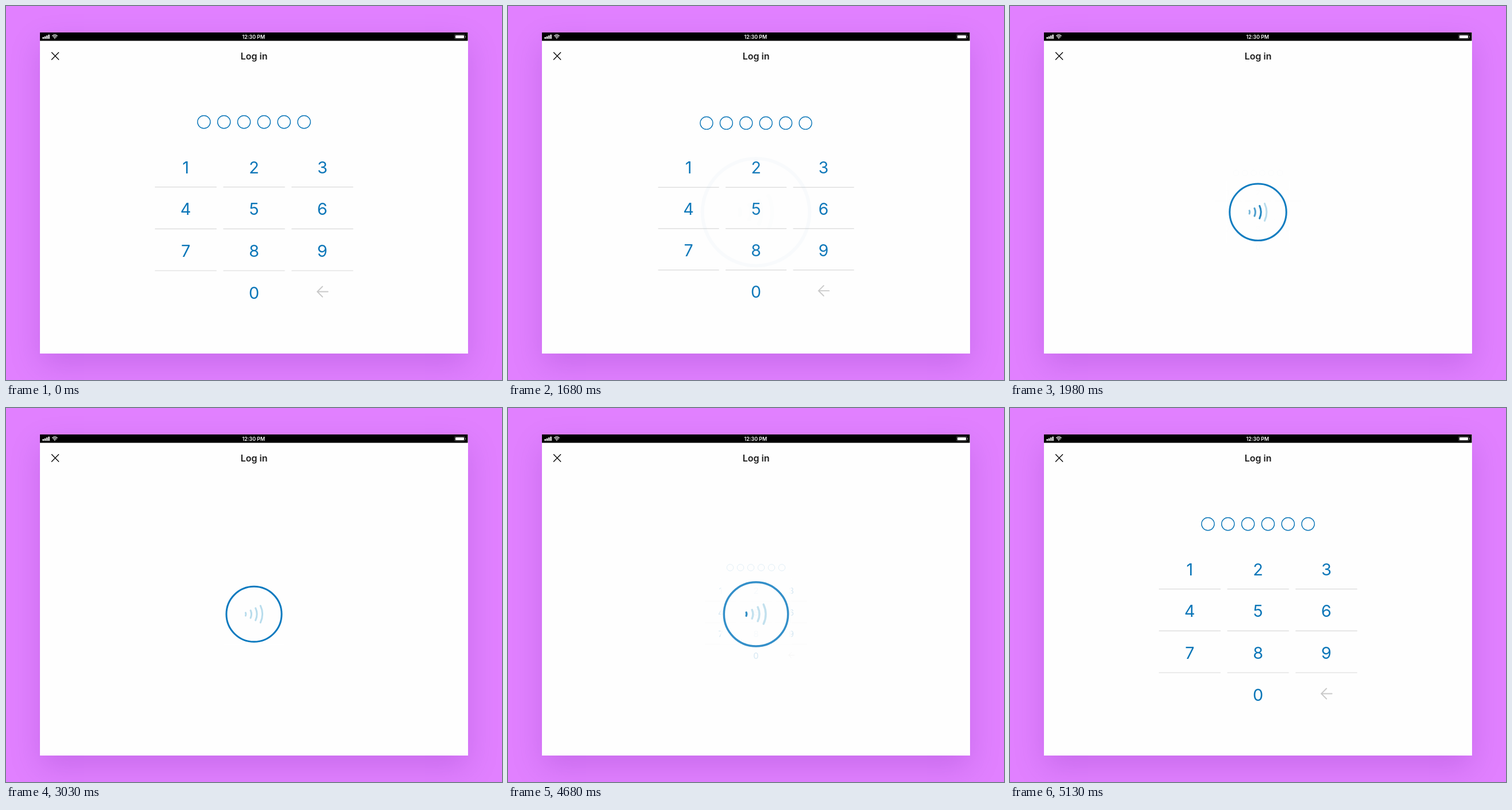
Recreate the animation shown at these times as an HTML page. Size 862 px wide and 650 px high, loop 5.22 s.

```html
<!DOCTYPE html>
<html lang="en">
<head>
<meta charset="utf-8">
<title>Log in</title>
<style>
  html, body { margin: 0; width: 100%; height: 100%; overflow: hidden; background: #e180ff; }
  .panel {
    position: absolute; left: 59px; top: 46px; width: 743.5px; height: 558px;
    background: #fefefe; box-shadow: 0 20px 50px rgba(80, 0, 140, .17);
  }
  svg { position: absolute; left: 0; top: 0; font-family: Inter, sans-serif; }
  text { text-anchor: middle; }
  .line { fill: none; stroke-linecap: round; }
  #keypad text { font-size: 28.8px; fill: #0b76b8; }
</style>
</head>
<body>
<div class="panel"></div>
<svg width="862" height="650" viewBox="0 0 862 650">
  <rect x="59" y="46" width="743.5" height="14.5"/>
  <g fill="#fff">
    <path d="M63.5 54h2.3v3h-2.3zM66.8 52.7h2.3V57h-2.3zM70.1 51.3h2.3V57h-2.3zM73.4 49.8h2.3V57h-2.3z"/>
    <text x="430.3" y="57" font-size="8.9" font-weight="600">12:30 PM</text>
    <rect x="781" y="51" width="15" height="5" rx=".8"/>
    <path d="M83.2 54.8 84.8 57l1.6-2.2a2.5 2.5 0 0 0-3.2 0z"/>
  </g>
  <path class="line" d="M80.5 51.9a6.2 6.2 0 0 1 8.6 0M82.2 53.7a3.7 3.7 0 0 1 5.2 0" stroke="#fff" stroke-width="1.3"/>
  <rect x="779.6" y="49.6" width="17.8" height="7.8" rx="1.8" fill="none" stroke="#777" stroke-width=".7"/>
  <path class="line" d="M798.6 52.5v2" stroke="#777"/>

  <path class="line" d="M79.5 80.7l12 12.4m0-12.4l-12 12.4" stroke="#111" stroke-width="1.5"/>
  <text x="431.2" y="92.6" font-size="16" font-weight="600" fill="#1c1c1c">Log in</text>

  <g id="keypad"></g>
  <g id="reader">
    <rect x="-53" y="-53" width="106" height="106" fill="#fefefe"/>
    <circle r="48" fill="none" stroke="#0c7abf" stroke-width="3"/>
  </g>
</svg>
<script>
const LOOP = 5220, FADE = 367, SHOW = 1650, HIDE = 4586;
const PULSE_START = 1800, PULSE = 720, STEP = 75, GLOW = 285;
const BASE = [184, 220, 236], LIT = [12, 122, 187];

const keypad = document.getElementById('keypad');
const reader = document.getElementById('reader');

function add(parent, tag, attrs, label = '') {
  const el = document.createElementNS('http://www.w3.org/2000/svg', tag);
  for (const k in attrs) el.setAttribute(k, attrs[k]);
  el.textContent = label;
  return parent.appendChild(el);
}

for (let i = 0; i < 6; i++) {
  add(keypad, 'circle', { cx: 344 + 34.8 * i, cy: 201.6, r: 11.1, fill: 'none', stroke: '#0b76b8', 'stroke-width': 1.4 });
}
for (let i = 0; i < 9; i++) {
  const x = 312.4 + 118.7 * (i % 3), row = 72.7 * Math.floor(i / 3);
  add(keypad, 'text', { x, y: 290.6 + row }, i + 1);
  add(keypad, 'path', { d: `M${x - 53.6} ${314.6 + row}h107.2`, stroke: '#d9d9d9', 'stroke-width': 1.2 });
}
add(keypad, 'text', { x: 431, y: 508.6 }, 0);
add(keypad, 'path', { class: 'line', d: 'M559.5 496.5H541m9-9l-9 9 9 9', stroke: '#c9c9c9', 'stroke-width': 1.9 });

// Four waves share one centre and a half angle of 25 degrees.
const waves = [6, 15.5, 25, 34.5].map(r => {
  const a = 25 * Math.PI / 180, x = -20 + r * Math.cos(a), y = r * Math.sin(a);
  return add(reader, 'path', { class: 'line', d: `M${x} ${-y}A${r} ${r} 0 0 1 ${x} ${y}`, 'stroke-width': 3 });
});

const clamp = v => Math.max(0, Math.min(1, v));
const smooth = v => (v = clamp(v), v * v * (3 - 2 * v));

function glow(t, i) {
  if (t < PULSE_START) return 0;
  const age = (t - PULSE_START) % PULSE - i * STEP;
  return age < 0 ? 0 : clamp(1 - age / GLOW);
}

function draw(t) {
  const p = smooth((t - SHOW) / FADE) - smooth((t - HIDE) / FADE);
  keypad.setAttribute('transform', `translate(431 358.3) scale(${1 - .58 * p}) translate(-431 -358.3)`);
  keypad.setAttribute('opacity', 1 - p);
  reader.setAttribute('transform', `translate(431 358.3) scale(${1.96 - .96 * p})`);
  reader.setAttribute('opacity', p);
  waves.forEach((wave, i) => {
    const g = glow(t, i);
    wave.setAttribute('stroke', `rgb(${BASE.map((c, k) => c + (LIT[k] - c) * g)})`);
  });
}

const start = performance.now();
function tick() {
  draw((performance.now() - start) % LOOP);
  requestAnimationFrame(tick);
}
tick();
</script>
</body>
</html>
```
